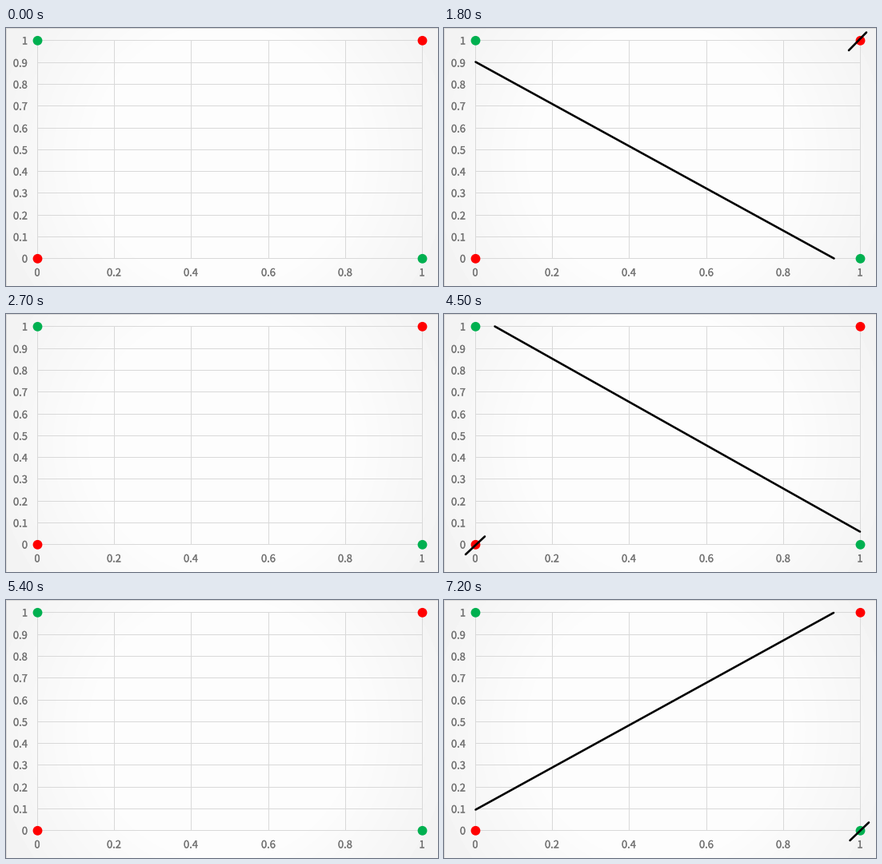
Recreate the animation shown at these times as a matplotlib script. Size 540 by 323 pixels, loop 8 s.

```python
import numpy as np
import matplotlib.pyplot as plt
from matplotlib.animation import FuncAnimation
from matplotlib.patches import Circle
from matplotlib.patheffects import withStroke

W, H, DPI = 540, 323, 100
PX = 72 / DPI  # one pixel in points
LEFT, RIGHT, TOP, BOTTOM = 39.5, 520.5, 15.8, 288.8
RED, GREEN, DARK_GREEN = "#ff0000", "#00b050", "#1a7241"
GRID, LABEL = "#d9d9d9", "#757575"

STEP_MS, HOLD = 100, 9
FRAMES = 80

# Each round: separating line, then a slash over the misclassified dot
ROUNDS = [
    (((39.5, 42.5), (487.5, 288.5)), ((506, 28), (528, 5.5))),
    (((63.5, 15.5), (520, 272.5)), ((27, 301), (51, 278.5))),
    (((39.5, 262.5), (487, 16)), ((507.5, 301), (531, 278.5))),
]


def px(u):
    return LEFT + u * (RIGHT - LEFT)


def py(v):
    return BOTTOM + v * (TOP - BOTTOM)


fig = plt.figure(figsize=(W / DPI, H / DPI), dpi=DPI)
ax = fig.add_axes([0, 0, 1, 1])
ax.axis("off")

# Soft radial background, nearly white in the middle
yy, xx = np.mgrid[0:H, 0:W] + 0.5
dist = np.hypot(xx - W / 2, yy - H / 2) / np.hypot(W / 2, H / 2)
shade = np.minimum(253, 255 - 13 * (dist - 0.39) / 0.61)
ax.imshow(shade, cmap="gray", vmin=0, vmax=255, extent=(0, W, H, 0),
          interpolation="nearest", aspect="auto")
ax.set(xlim=(0, W), ylim=(H, 0))


def rule(xs, ys):
    ax.plot(xs, ys, color=GRID, lw=PX, solid_capstyle="butt", snap=False)


def label(x, y, value, ha):
    ax.text(x, y + 4.5, f"{value:g}", ha=ha, va="baseline", color=LABEL,
            fontsize=12.9 * PX, fontname="Noto Sans CJK JP",
            path_effects=[withStroke(linewidth=0.3 * PX, foreground=LABEL)])


rule([0.5, 0.5], [0, H])
rule([0, W], [0.5, 0.5])
for i in range(11):
    y = np.floor(py(i / 10)) + 0.5
    rule([LEFT, RIGHT], [y, y])
    label(27, y + 0.5, i / 10, "right")
for i in range(6):
    x = np.floor(px(i / 5)) + 0.5
    rule([x, x], [TOP, BOTTOM])
    label(x - 0.5, 306, i / 5, "center")


def dot(u, v, color):
    return ax.add_patch(Circle((px(u), py(v)), 5.9, color=color, lw=0,
                               zorder=3, snap=False))


def stroke():
    return ax.plot([], [], color="black", lw=2.6 * PX, snap=False,
                   solid_capstyle="round", zorder=4)[0]


reds = [dot(0, 0, RED), dot(1, 1, RED)]
greens = [dot(0, 1, GREEN), dot(1, 0, GREEN)]
divider, slash = stroke(), stroke()


def draw(frame):
    turn, stage = divmod(frame // HOLD, 3)
    line, cross = ROUNDS[turn]
    divider.set_data(*zip(*line))
    slash.set_data(*zip(*cross))
    divider.set_visible(stage >= 1)
    slash.set_visible(stage == 2)
    for green in greens:
        green.set_color(DARK_GREEN if (turn, stage) == (0, 1) else GREEN)
    return divider, slash, *greens


anim = FuncAnimation(fig, draw, frames=FRAMES, interval=STEP_MS,
                     repeat=True, repeat_delay=0)
plt.show()
```
